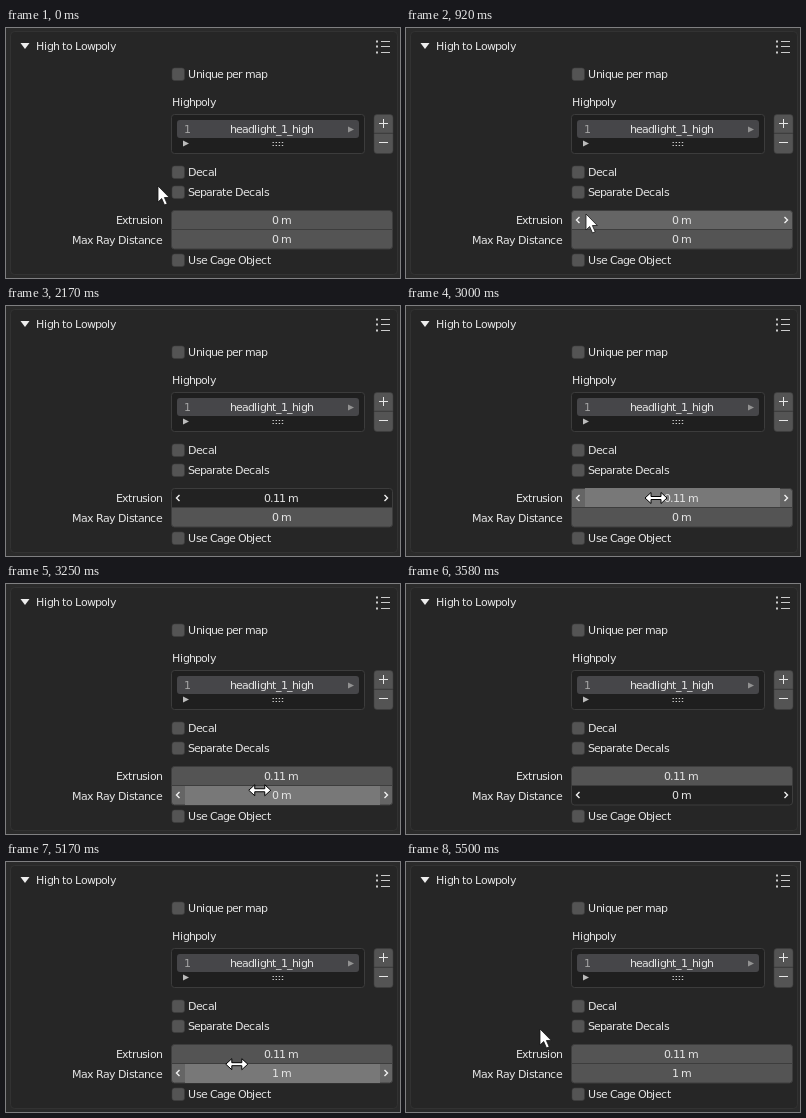
An HTML page for the animation above (5.66 s loop, 394 by 250 pixels).

```html
<!DOCTYPE html>
<html lang="en">
<head>
<meta charset="utf-8">
<style>
html, body { margin: 0; width: 100%; height: 100%; overflow: hidden; background: #2a2a2a; }
svg { display: block; width: 394px; height: 250px; }
text { font: 11px "DejaVu Sans", sans-serif; fill: #e4e4e4; white-space: pre; }
.chevron { fill: none; stroke: #f0f0f0; stroke-width: 1.4; }
</style>
</head>
<body>
<svg id="stage" viewBox="0 0 394 250">
  <rect x="4.500" y="3.500" width="387" height="243" rx="4" fill="#262626" stroke="#323232"/>
  <path d="M14.500 15h9l-4.500 6z" fill="#eee"/>
  <path d="M375 13h9v1h-9zM375 18h9v1h-9zM375 24h9v1h-9zM370 12.500h2v2h-2zM370 17.500h2v2h-2zM370 23.500h2v2h-2z" fill="#ccc"/>
  <g id="checks"></g>

  <rect x="165.500" y="86.500" width="193" height="39" rx="3" fill="#1f1f1f" stroke="#3c3c3c"/>
  <rect x="171" y="92" width="182" height="18" rx="3" fill="#464649"/>
  <path d="M342 98.500l6 3-6 3z" fill="#929292"/>
  <path d="M177 112.500l6 3-6 3z" fill="#bbb"/>
  <path d="M266.500 114.500h11M266.500 117.500h11" stroke="#ccc" stroke-width="1.200" stroke-dasharray="1.400 1.700"/>

  <g fill="#545454" stroke="#3d3d3d" stroke-width=".6">
    <path d="M371 86.500h13a3 3 0 0 1 3 3v15.500h-19v-15.500a3 3 0 0 1 3-3z"/>
    <path d="M368 105.500h19v17a3 3 0 0 1-3 3h-13a3 3 0 0 1-3-3z"/>
  </g>
  <path d="M373 95.500h9M377.500 91v9M373 114.500h9" stroke="#e8e8e8"/>

  <g id="labels"></g>
  <g id="fields"></g>

  <g id="edit">
    <rect id="selection" x="172" y="203" width="21" height="17" fill="#4772b3"/>
    <text id="typed"></text>
    <rect id="caret" x="179" y="203" width="2" height="17" fill="#71a8ff"/>
  </g>

  <path id="arrow" d="M0 0V16L3.700 12.500 6.500 19 9.200 17.800 6.400 11.500H11.300Z" fill="#fff" stroke="#161616" stroke-width=".8"/>
  <path id="resize" d="M-11 0l6-5.500v4H5v-4L11 0 5 5.500v-4H-5v4z" fill="#fff" stroke="#000"/>
  <path id="beam" d="M-3.500-7.500h2l1 1 1-1h2M-.5-6.500v11M-3.500 5.500h2l1-1 1 1h2" fill="none" stroke="#000"/>
</svg>

<script>
const $ = id => document.getElementById(id);
const LOOP = 5660, FPS = 12, SIZE = 11;
const IDLE = '#545454', HOVER = '#656565', LIT = '#787878', PRESSED = '#222';

// The interface truncates every glyph advance to whole pixels.
const pen = document.createElement('canvas').getContext('2d');
pen.font = `${SIZE * 100}px "DejaVu Sans", sans-serif`;
const advance = c => Math.floor(pen.measureText(c).width / 100);

// align: 0 = start, .5 = centre, 1 = end
function setText(el, str, x, y, align = 0) {
  const widths = [...str].map(advance);
  let at = Math.floor(x - align * widths.reduce((a, b) => a + b, 0));
  el.textContent = str;
  el.setAttribute('x', widths.map(w => (at += w) - w).join(' '));
  el.setAttribute('y', y);
}

function label(str, x, y, align, color) {
  const el = document.createElementNS('http://www.w3.org/2000/svg', 'text');
  if (color) el.style.fill = color;
  setText(el, str, x, y, align);
  $('labels').append(el);
}

label('High to Lowpoly', 30, 22);
label('Highpoly', 166, 78);
label('1', 178, 105, 0, '#a4a4a4');
label('headlight_1_high', 265.5, 105, 0.5);
label('Extrusion', 156, 196, 1);
label('Max Ray Distance', 156, 216, 1);

for (const [name, y] of [['Unique per map', 46], ['Decal', 144], ['Separate Decals', 164], ['Use Cage Object', 232]]) {
  $('checks').innerHTML += `<rect x="166" y="${y - 6}" width="12.500" height="12.500" rx="2.500" fill="#545454" stroke="#3d3d3d" stroke-width=".6"/>`;
  label(name, 182, y + 4);
}

// Two joined number fields, rounded only on their outer corners.
const fields = [
  { top: 182, bottom: 201, base: 196, shape: 'M165.500 201.500V185.500a3 3 0 0 1 3-3H383.500a3 3 0 0 1 3 3V201.500Z' },
  { top: 202, bottom: 221, base: 215, shape: 'M165.500 201.500H386.500V218a3 3 0 0 1-3 3H168.500a3 3 0 0 1-3-3Z' }
];
$('fields').innerHTML = fields.map(({ top, base, shape }, i) => `
  <path id="back${i}" d="${shape}" stroke="#3d3d3d"/>
  <rect id="zone${i}" x="179" y="${top}" width="195" height="19" fill="${LIT}"/>
  <path id="chevrons${i}" class="chevron" d="M173.500 ${base - 7}l-3 3 3 3M378.500 ${base - 7}l3 3-3 3"/>
  <text id="value${i}"></text>`).join('');

// Pointer path: [step, x, y]
const path = [
  [0, 152, 158], [4, 156, 179], [7, 156, 179], [8, 156, 186], [9, 156, 186],
  [10, 165, 186], [11, 180, 186], [12, 208, 189], [14, 250, 192], [36, 250, 192],
  [40, 255, 211], [61, 255, 211], [66, 134, 167], [68, 134, 167]
];

function pointer(step) {
  const i = Math.max(1, path.findIndex(p => p[0] >= step));
  const [s0, x0, y0] = path[i - 1], [s1, x1, y1] = path[i];
  const f = (step - s0) / (s1 - s0);
  return [x0 + (x1 - x0) * f, y0 + (y1 - y0) * f];
}

function extrusion(step) {
  if (step < 18) return '0 m';
  const v = step < 26 ? 0.02 + (Math.min(step, 24) - 18) * 0.08 / 6 : 0.11;
  return v.toFixed(2) + ' m';
}

const show = (id, on) => $(id).style.display = on ? '' : 'none';

function drawField(i, value, state, middle) {
  $('back' + i).setAttribute('fill', { idle: IDLE, hover: HOVER }[state] || PRESSED);
  setText($('value' + i), state === 'edit' ? '' : value, 275.5, fields[i].base, 0.5);
  show('chevrons' + i, state === 'hover' || state === 'drag');
  show('zone' + i, state === 'hover' && middle);
}

function draw(t) {
  const step = Math.floor((t + 4) * FPS / 1000);
  const within = (a, b) => step >= a && step < b;
  const [x, y] = pointer(step);
  const middle = x >= 182 && x <= 374;
  const drags = [within(15, 36), within(42, 44)];
  const editing = within(44, 53);
  const values = [extrusion(step), step < 53 ? '0 m' : '1 m'];
  let over = false;

  fields.forEach(({ top, bottom }, i) => {
    const inside = x >= 165 && x <= 387 && y >= top && y <= bottom;
    over = over || inside;
    const state = drags[i] ? 'drag' : i === 1 && editing ? 'edit' : inside ? 'hover' : 'idle';
    drawField(i, values[i], state, middle);
  });

  show('edit', editing);
  show('selection', step < 47);
  show('caret', step >= 47);
  setText($('typed'), step < 47 ? '0 m' : '1', 172, 215);

  const free = !drags[0] && !drags[1] && !editing;
  const wide = over && middle;
  show('arrow', free && !wide);
  show('resize', free && wide);
  show('beam', within(45, 53));
  for (const id of ['arrow', 'resize', 'beam'])
    $(id).setAttribute('transform', `translate(${x} ${y})`);
}

const start = performance.now();
function tick() {
  draw((performance.now() - start) % LOOP);
  requestAnimationFrame(tick);
}
tick();
</script>
</body>
</html>
```
